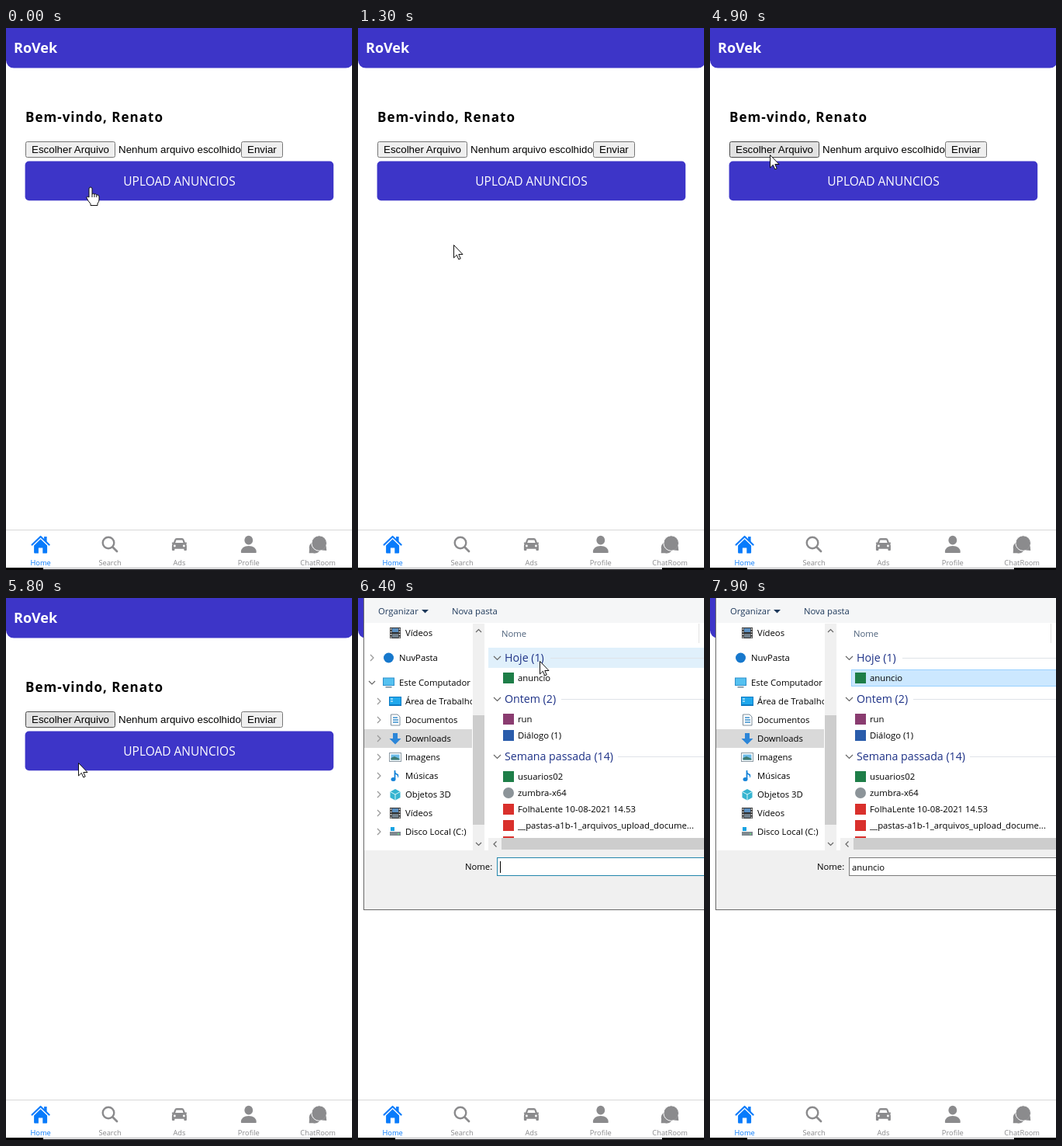
An HTML page that plays this animation: 446 px wide and 698 px high, repeating every 8 s.

```html
<!DOCTYPE html>
<html lang="pt">
<head>
<meta charset="utf-8">
<style>
html, body { margin: 0; width: 100%; height: 100%; overflow: hidden; background: #fff; }
svg { display: block; width: 446px; height: 698px; }
text { font-family: "Open Sans", "Noto Sans", sans-serif; font-size: 11.3px; white-space: pre; }
.form { font-family: "Liberation Sans", Arial, sans-serif; font-size: 13.333px; }
.nav { font-size: 9.3px; text-anchor: middle; }
.group { font-size: 14.2px; fill: #1e3287; }
.line { fill: none; stroke: #666; stroke-width: 1.2; }
</style>
</head>
<body>
<svg id="stage" viewBox="0 0 446 698" xmlns="http://www.w3.org/2000/svg"></svg>
<script>
const LOOP = 8000, STEP = 100, DIALOG_OPENS = 5900, FILE_PICKED = 7000, CURSOR_GONE = 7900;
const PURPLE = '#3d35c8', BLUE = '#087bfb', GRAY = '#8b8b8d';

const rect = (x, y, w, h, fill, extra = '') =>
  `<rect x="${x}" y="${y}" width="${w}" height="${h}" fill="${fill}" ${extra}/>`;
const circle = (x, y, r, fill, extra = '') =>
  `<circle cx="${x}" cy="${y}" r="${r}" fill="${fill}" ${extra}/>`;
const path = (d, fill, extra = '') => `<path d="${d}" fill="${fill}" ${extra}/>`;
const text = (x, y, s, extra = '') => `<text x="${x}" y="${y}" ${extra}>${s}</text>`;
const line = d => `<path class="line" d="${d}"/>`;
const at = (x, y, body) => `<g transform="translate(${x} ${y})">${body}</g>`;
const square = fill => rect(-7, -7, 14, 14, fill);

// Icons are drawn around their own centre.
const navIcons = {
  Home: path('M-11 .5L0-10L11 .5', 'none', `stroke="${BLUE}" stroke-width="2.2" stroke-linecap="round" stroke-linejoin="round"`) +
    path('M4.500-10H8V-2L4.500-5.500ZM-8.500 1.500L0-6.700L8.500 1.500V10.500Q8.500 11.500 7.500 11.500H2.700V4.500H-2.700V11.500H-7.500Q-8.500 11.500-8.500 10.500Z', BLUE),
  Search: circle(-2, -2, 7.3, 'none', `stroke="${GRAY}" stroke-width="2.4"`) +
    path('M3.500 3.500L9 9', 'none', `stroke="${GRAY}" stroke-width="2.8" stroke-linecap="round"`),
  Ads: path('M-9.500-2.500H-7.500L-6-6.300Q-5.400-8-3.500-8H3.500Q5.400-8 6-6.300L7.500-2.500H9.500V-.8L8.800-.5Q9.500.5 9.500 2V7Q9.500 8 8.500 8H7Q6 8 6 7V5.700H-6V7Q-6 8-7 8H-8.500Q-9.500 8-9.500 7V2Q-9.500.5-8.800-.5L-9.500-.8ZM-5.200-2H5.200L4-5.500H-4Z', GRAY, 'fill-rule="evenodd"') +
    circle(-6, 2, 1.4, '#fff') + circle(6, 2, 1.4, '#fff'),
  Profile: `<ellipse cx="0" cy="-5.300" rx="5.400" ry="5.900" fill="${GRAY}"/>` +
    path('M-10 10Q-9.500 2 0 2T10 10Q10 11 9 11H-9Q-10 11-10 10Z', GRAY),
  ChatRoom: circle(-4, 4, 7.5, GRAY) + path('M-11 3L-11.500 11.300L-4 11.300Z', GRAY) +
    circle(1.5, -1.5, 9.8, GRAY, 'stroke="#fff" stroke-width="1"') + path('M5 7.500L11 8L10.500 2Z', GRAY)
};

const film = rect(-7, -7, 14, 14, '#303030') + rect(-4, -6, 8, 5, '#5b8fc0') + rect(-4, 1, 8, 5, '#71808c') +
  path('M-5.500-6V7M5.500-6V7', 'none', 'stroke="#ddd" stroke-width="1.500" stroke-dasharray="2 1.500"');
const monitor = rect(-7.5, -6.5, 15, 10.5, '#2d8fcb') + rect(-6.5, -5.5, 13, 8.5, '#55c1f0') +
  rect(-4, 5, 8, 1.5, '#718797');
const treeIcons = {
  film, monitor,
  cloud: circle(0, 0, 6.5, '#1778cc'),
  desktop: rect(-8, -6, 16, 12, '#0c7bc4') + rect(-7, -5, 14, 9, '#20a8ec') + path('M-6-3H-3M-6 0H-3', 'none', 'stroke="#fff"'),
  page: path('M-5.500-7H3L6-4V7H-5.500Z', '#fff', 'stroke="#7d8e9b"') +
    path('M-3-3H3M-3 0H4M-3 3H4', 'none', 'stroke="#3a90cd" stroke-width="1.300"'),
  download: path('M-3-7H3V0H7.500L0 7.500L-7.500 0H-3Z', '#2c86d8'),
  picture: rect(-7.5, -5.5, 15, 11, '#fff', 'stroke="#8c9ba5"') + rect(-5.5, -3.5, 11, 7, '#6dbce9') +
    path('M-5.500 3.500V1L-1-1L5.500 2V3.500Z', '#3d7b72'),
  music: path('M-1-7Q0-3 4-2Q5 1 3 3Q4-1 0-2V4', '#1684d9') + path('M-.5-7V4', 'none', 'stroke="#1684d9" stroke-width="1.800"') +
    `<ellipse cx="-2.500" cy="4.500" rx="3" ry="2.500" fill="#1684d9"/>`,
  cube: path('M0-7L6.500-3.500V4L0 7.500L-6.500 4V-3.500Z', '#35b4d0') +
    path('M-6.500-3.500L0 0L6.500-3.500M0 0V7.500', 'none', 'stroke="#d7f6fa"'),
  disk: rect(-7, 0, 14, 5, '#7e8990') + rect(3, 2, 2, 1.5, '#60e17b') + rect(-6, -6, 5, 5, '#16a3e3')
};

const tree = [
  [45, 'Vídeos', 'film', 1, ''], [77, 'NuvPasta', 'cloud', 0, '>'], [109, 'Este Computador', 'monitor', 0, 'v'],
  [133, 'Área de Trabalho', 'desktop', 1, '>'], [157, 'Documentos', 'page', 1, '>'],
  [181, 'Downloads', 'download', 1, '>'], [205, 'Imagens', 'picture', 1, '>'],
  [229, 'Músicas', 'music', 1, '>'], [253, 'Objetos 3D', 'cube', 1, '>'],
  [277, 'Vídeos', 'film', 1, '>'], [301, 'Disco Local (C:)', 'disk', 1, '>']
];
const GREEN = '#1e7e48', RED = '#d9302c';
const files = [
  [103, 'anuncio', GREEN], [156, 'run', '#8a3c70'], [177, 'Diálogo (1)', '#2a5cab'],
  [230, 'usuarios02', GREEN], [251, 'zumbra-x64', ''],
  [272, 'FolhaLente 10-08-2021 14.53', RED], [293, '__pastas-a1b-1_arquivos_upload_docume...', RED], [314, '', RED]
];
const groups = [[77, 'Hoje (1)', 248], [130, 'Ontem (2)', 262], [204, 'Semana passada (14)', 335]];

const formButton = (x, w, label, id = '') =>
  rect(x + .5, 146.5, w - 1, 20, '#efefef', `rx="2" stroke="#767676" ${id}`) + text(x + 8, 161, label, 'class="form"');

function page() {
  const tabs = Object.entries(navIcons).map(([label, icon], i) => {
    const x = 44.6 + i * 89.4;
    return at(x, 665, icon) + text(x, 692, label, `class="nav" fill="${i ? GRAY : BLUE}"`);
  }).join('');
  return rect(0, 0, 446, 698, '#fff') +
    rect(0, -20, 448, 71.6, PURPLE, 'rx="10"') +
    text(10, 32, 'RoVek', 'fill="#fff" style="font-size:18px;font-weight:700"') +
    text(25, 121, 'Bem-vindo, Renato', 'style="font-size:17px;font-weight:700;letter-spacing:1px"') +
    formButton(25, 116, 'Escolher Arquivo', 'id="choose"') +
    text(145, 161, 'Nenhum arquivo escolhido', 'class="form"') + formButton(303, 54, 'Enviar') +
    rect(24.6, 171.6, 397.6, 50.6, PURPLE, 'rx="5"') +
    text(223.5, 203, 'UPLOAD ANUNCIOS', 'fill="#fff" text-anchor="middle" style="font-size:15.5px"') +
    rect(0, 646, 446, 1, '#d8d8d8') + tabs +
    rect(48, 695, 344, 1, '#b5b5b8') + rect(48, 697, 344, 1, '#15151a') +
    rect(0, 695, 48, 3, '#000') + rect(392, 695, 54, 3, '#000');
}

function dialog() {
  const rows = tree.map(([y, label, icon, depth]) =>
    at(depth ? 48 : 39.5, y, treeIcons[icon]) + text(depth ? 61 : 53, y + 4, label)).join('');
  const chevrons = tree.map(([y, , , depth, mark]) => {
    const x = depth ? 27 : 18;
    if (mark === 'v') return line(`M${x - 4} ${y - 2}l4 4l4-4`);
    return mark && `<path class="line" style="stroke:#989898" d="M${x - 2} ${y - 4}l4 4l-4 4"/>`;
  }).join('');
  const list = files.map(([y, label, color]) =>
    at(194, y, color ? square(color) : circle(0, 0, 7, '#8c9499')) + text(206, y + 4, label)).join('');
  const heads = groups.map(([y, label, x]) =>
    line(`M175 ${y - 2}l4.500 4.500l4.500-4.500`) + text(189, y + 5, label, 'class="group"') +
    rect(x, y, 446 - x, 1, '#dfe3e8')).join('');
  return rect(7.5, -2, 450, 403.5, '#f0f0f0', 'stroke="#696969"') +
    rect(8, 0, 438, 32, '#f5f6f7') + rect(8, 32, 438, 293, '#fff') +
    text(26, 21, 'Organizar', 'fill="#1e395b"') + path('M82 15H91L86.500 19.500Z', '#1e395b') +
    text(121, 21, 'Nova pasta', 'fill="#1e395b"') +
    rect(8, 169, 139, 24, '#d9d9d9') +
    `<g clip-path="url(#treeClip)">${rows}<g id="chevrons">${chevrons}</g></g>` +
    rect(148, 33, 15, 292, '#f0f0f0') + rect(148, 151, 15, 141, '#cdcdcd') +
    line('M152 44l3.500-3.500l3.500 3.500M152 315l3.500 3.500l3.500-3.500') +
    text(185, 50, 'Nome', 'fill="#4c607a"') + rect(439, 33, 1, 25, '#e2e2e2') +
    rect(168, 64, 278, 26, '#e0f0fb', 'id="groupHover"') +
    rect(182.5, 92.5, 270, 21, '#e5f3ff', 'id="fileRow"') + heads +
    `<g clip-path="url(#listClip)">${list}</g>` +
    rect(168, 309, 278, 16, '#f0f0f0') + rect(185, 309, 261, 15, '#cdcdcd') + line('M178.500 313.500l-3.500 3.500l3.500 3.500') +
    text(138, 350, 'Nome:') + rect(179.5, 334.5, 270, 23, '#fff', 'id="field"') +
    text(183, 351, 'anuncio', 'id="fileName"') + rect(183, 339, 1, 15, '#000', 'id="caret"');
}

const cursor =
  path('M.5.5V17L4.300 13.300L6.800 19L9.200 18L6.800 12.500H12Z', '#fff', 'id="arrow" stroke="#111"') +
  path('M-2 2Q-2 0 0 0T2 2V9Q3.500 7.500 5 9Q6.800 8 7.800 10Q10.500 9 11 12V16Q11 19 9 21V23.500H0V21.500Q-3 18-5 14Q-5.500 11-2 13ZM2 9V13M5 9V13M7.800 10V13', '#fff',
    'id="hand" stroke="#111" stroke-linejoin="round"');

const stage = document.getElementById('stage');
stage.innerHTML = `<defs><clipPath id="treeClip">${rect(8, 33, 139, 292, '#000')}</clipPath>` +
  `<clipPath id="listClip">${rect(168, 59, 278, 250, '#000')}</clipPath></defs>` +
  page() + `<g id="dialog">${dialog()}</g><g id="cursor">${cursor}</g>`;

const part = id => document.getElementById(id);
const show = (id, on) => part(id).setAttribute('visibility', on ? 'inherit' : 'hidden');
const set = (id, values) => Object.entries(values).forEach(([k, v]) => part(id).setAttribute(k, v));
const clamp = v => Math.max(0, Math.min(1, v));

// Time, x, y of the pointer tip.
const route = [
  [0, 109, 205], [500, 109, 206], [1300, 123, 279], [3400, 123, 279], [3500, 103, 270],
  [4300, 84, 150], [4900, 77, 163], [5100, 77, 163], [5800, 93, 212], [5900, 95, 210],
  [6400, 234, 81], [6900, 222, 100], [8000, 222, 100]
];

function pointer(t) {
  const i = Math.max(1, route.findIndex(key => key[0] >= t));
  const [t0, x0, y0] = route[i - 1], [t1, x1, y1] = route[i];
  const k = clamp((t - t0) / (t1 - t0)), eased = k * k * (3 - 2 * k);
  return [x0 + (x1 - x0) * eased, y0 + (y1 - y0) * eased];
}

function draw(time) {
  const t = Math.floor(time % LOOP / STEP) * STEP;
  const [x, y] = pointer(t);
  const open = t >= DIALOG_OPENS, picked = t >= FILE_PICKED;
  const hand = t < 5000 && y > 172 && y < 222;
  const chooseHover = t >= 4900 || (x > 25 && x < 141 && y > 146 && y < 167);
  const fileHover = y > 91 && y < 113 && x > 182;

  set('cursor', { transform: `translate(${Math.round(x)} ${Math.round(y)})` });
  show('hand', t < CURSOR_GONE && hand);
  show('arrow', t < CURSOR_GONE && !hand);
  set('choose', chooseHover ? { fill: '#e2e2e2', stroke: '#4a4a4a' } : { fill: '#efefef', stroke: '#767676' });

  part('dialog').setAttribute('display', open ? 'inline' : 'none');
  set('chevrons', { opacity: Math.min(clamp((t - 5900) / 300), clamp((7400 - t) / 500)) });
  show('groupHover', x > 168 && y > 64 && y <= 90);
  show('fileRow', picked || fileHover);
  set('fileRow', picked ? { fill: '#cce8ff', stroke: '#99d1ff' } : { fill: '#e5f3ff', stroke: 'none' });
  set('field', { stroke: picked ? '#7a7a7a' : '#2386ac' });
  show('fileName', picked);
  show('caret', !picked && (t - DIALOG_OPENS) % 1060 < 530);
}

function tick(now) {
  draw(now);
  requestAnimationFrame(tick);
}
draw(0);
requestAnimationFrame(tick);
</script>
</body>
</html>
```
